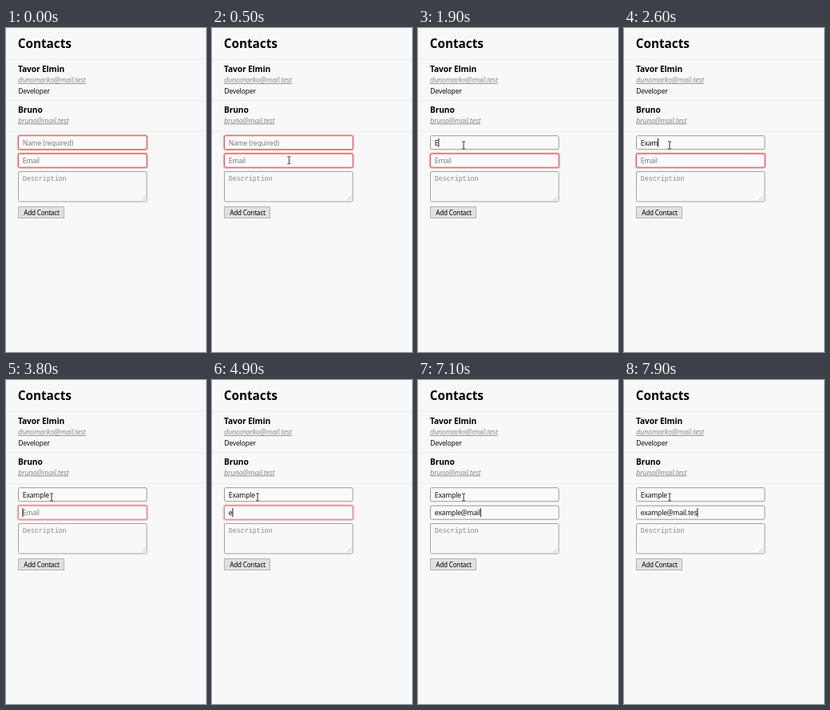
These frames come from a looping animation (250x405 px, 8 s). An HTML page:

```html
<!DOCTYPE html>
<html lang="en">
<head>
<meta charset="utf-8">
<title>Contacts</title>
<style>
  html, body { margin: 0; width: 100%; height: 100%; overflow: hidden; background: #f8f8f8; }
  svg { display: block; width: 100vw; height: 100vh; }
  text { font: 8.6px "Noto Sans", "Open Sans", sans-serif; letter-spacing: -.2px; fill: #111; white-space: pre; }
  .title { font-size: 15.3px; font-weight: 700; letter-spacing: 0; fill: #000; }
  .who { font-size: 10.2px; font-weight: 700; letter-spacing: -.1px; fill: #000; }
  .mail { font-size: 9px; font-style: italic; fill: #8c8c8c; text-decoration: underline; }
  .hint { fill: #7c7c7c; }
  .mono { font: 8.3px "Liberation Mono", monospace; letter-spacing: 0; fill: #8a8a8a; }
  .button { font-size: 8.1px; font-weight: 500; fill: #000; }
  .rule { stroke: #f1f1f1; }
  .box { fill: #fafafa; stroke: #a2a2a2; }
  .area { fill: #f8f8f8; }
  .glow { fill: none; stroke: #f00; }
  .thin { fill: none; stroke: #222; stroke-width: .9; }
</style>
</head>
<body>
<svg id="stage" viewBox="0 0 250 405">
  <rect width="250" height="405" fill="#f8f8f8"/>
  <path class="rule" d="M0 39.5H250M0 90.5H250M0 129.5H250"/>
  <text class="title" x="14.7" y="25">Contacts</text>
  <text class="who" x="15" y="55">Tavor Elmin</text>
  <text class="mail" x="15" y="68">dunomarko@mail.test</text>
  <text x="15.2" y="82.3">Developer</text>
  <text class="who" x="15" y="105.8">Bruno</text>
  <text class="mail" x="15" y="118.5">bruno@mail.test</text>
  <g id="fields"></g>
  <rect class="box area" x="15.5" y="179.5" width="160.5" height="37.5" rx="1.5"/>
  <text class="hint mono" x="20.8" y="190.5">Description</text>
  <path d="M168.5 215.5l6-6M171.5 215.5l3-3" stroke="#bbb" stroke-width=".7"/>
  <rect x="15.5" y="223.5" width="57" height="14" fill="#e1e1e1" stroke="#b4b4b4"/>
  <text class="button" x="22.3" y="233.6">Add Contact</text>
  <rect id="caret" width=".9" height="11" fill="#000"/>
  <g id="mouse">
    <path id="beam" class="thin" d="M-2 -4.5H-.6L0 -4L.6 -4.5H2M0 -4V4M-2 4.5H-.6L0 4L.6 4.5H2"/>
    <path id="arrow" d="M0 0V11L2.6 8.6L4.3 12.4L6 11.7L4.3 8H7.8Z" fill="#fff" stroke="#000" stroke-width=".7"/>
  </g>
</svg>
<script>
const LOOP = 8000;
const TEXT_X = 20.8;
const $ = id => document.getElementById(id);

function make(tag, attrs, parent) {
  const el = document.createElementNS("http://www.w3.org/2000/svg", tag);
  for (const key in attrs) el.setAttribute(key, attrs[key]);
  return parent.appendChild(el);
}

const show = (el, on) => el.setAttribute("visibility", on ? "visible" : "hidden");

// keys: [time, number of characters typed so far]
const inputs = [
  {
    y: 134.7, hint: "Name (required)", value: "Example",
    keys: [[1900, 1], [2300, 2], [2400, 3], [2600, 4], [3000, 5], [3200, 6], [3300, 7]],
    valid: s => s.length > 0
  },
  {
    y: 157.2, hint: "Email", value: "example@mail.test",
    keys: [[4900, 1], [5100, 2], [5200, 3], [5400, 4], [5700, 5], [5900, 6], [6000, 7], [6800, 8],
           [6900, 9], [7000, 10], [7100, 12], [7400, 13], [7700, 14], [7800, 15], [7900, 16]],
    valid: s => /^\w+@\w+(\.\w+)*$/.test(s)
  }
];
const CLICK = 1200, TAB = 3800;
const BLINKS = [[1700, 1900], [4400, 4900], [6500, 6800]];

for (const input of inputs) {
  const parent = $("fields");
  const frame = { x: 15.5, y: input.y, width: 160.5, height: 17, rx: 2 };
  input.glows = [4.2, 2.4].map(w =>
    make("rect", { ...frame, class: "glow", "stroke-width": w }, parent));
  input.box = make("rect", { ...frame, class: "box" }, parent);
  input.text = make("text", { x: TEXT_X, y: input.y + 12.1 }, parent);
}

function drawInput(input, t, tabbed) {
  const typed = input.keys.filter(k => k[0] <= t).pop();
  const value = typed ? input.value.slice(0, typed[1]) : "";
  const bad = !input.valid(value);
  const opacity = tabbed ? [.14, .16] : [.08, .32];
  input.glows.forEach((glow, i) => {
    show(glow, bad);
    glow.setAttribute("stroke-opacity", opacity[i]);
  });
  input.box.style.stroke = !bad ? "#999" : tabbed ? "#bd8a8a" : "#d25c5c";
  input.text.textContent = value || input.hint;
  input.text.setAttribute("class", value ? "" : "hint");
  input.end = TEXT_X + (value ? input.text.getComputedTextLength() : -.3);
}

function drawMouse(t) {
  const step = Math.min(6, Math.floor((t - 200) / 100));
  const left = (1 - step / 6) ** 2;
  const x = 57 + 157 * left, y = 146.5 + 75 * left;
  const overField = x < 176 && (y < 174 || (y > 179 && y < 217));
  $("mouse").setAttribute("transform", `translate(${x} ${y})`);
  show($("beam"), t >= 200 && overField);
  show($("arrow"), t >= 200 && !overField);
}

function draw(t) {
  const tabbed = t >= TAB;
  drawInput(inputs[0], t, false);
  drawInput(inputs[1], t, tabbed);
  const active = inputs[tabbed ? 1 : 0];
  $("caret").setAttribute("x", active.end);
  $("caret").setAttribute("y", active.y + 3);
  show($("caret"), t >= CLICK && !BLINKS.some(([from, to]) => t >= from && t < to));
  drawMouse(t);
}

function tick() {
  draw(performance.now() % LOOP);
  requestAnimationFrame(tick);
}
tick();
</script>
</body>
</html>
```
